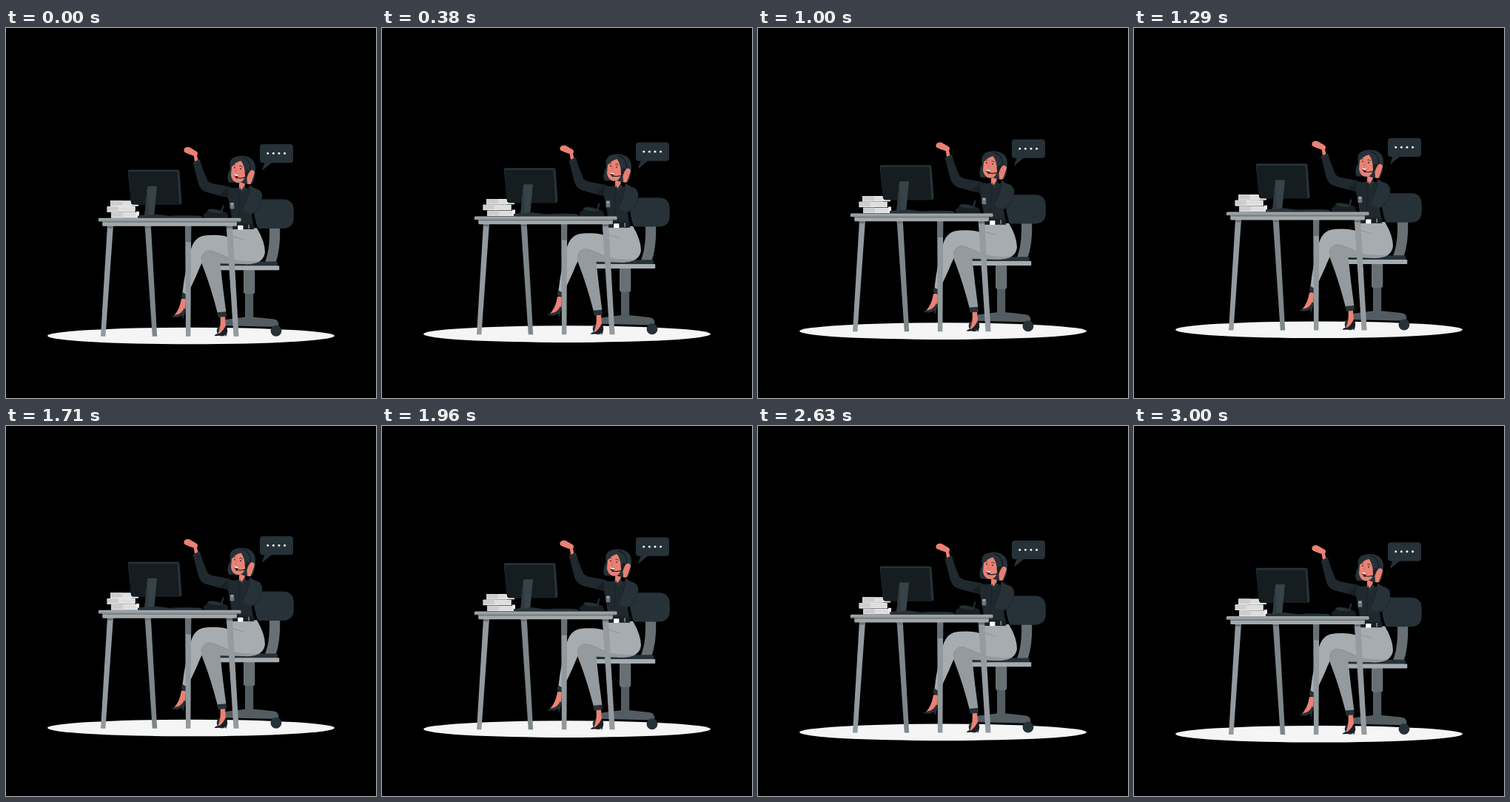
These frames come from a looping animation (500x500 px, 3040 ms). An HTML page with a canvas:

```html
<!DOCTYPE html>
<html lang="en">
<head>
<meta charset="utf-8">
<style>
html, body { margin: 0; width: 100%; height: 100%; overflow: hidden; background: #000; }
canvas { display: block; width: 500px; height: 500px; }
</style>
</head>
<body>
<canvas id="stage"></canvas>
<script>
const LOOP = 3040, FRAMES = 73, RISE = 9.7;
const canvas = document.getElementById('stage');
const ctx = canvas.getContext('2d');
const scale = window.devicePixelRatio || 1;
canvas.width = canvas.height = 500 * scale;

const DARK = '#263238', DEEP = '#182024', SHIRT = '#20292e', SKIN = '#e98274';
const LIGHT = '#a6acaf', MID = '#949a9d', STEEL = '#687074';

function fill(d, color) {
  ctx.fillStyle = color;
  ctx.fill(new Path2D(d));
}

function line(d, color, width) {
  ctx.strokeStyle = color;
  ctx.lineWidth = width;
  ctx.stroke(new Path2D(d));
}

function box(x, y, w, h, color, r = 0) {
  ctx.fillStyle = color;
  ctx.beginPath();
  ctx.roundRect(x, y, w, h, r);
  ctx.fill();
}

function oval(x, y, rx, ry, color, turn = 0) {
  ctx.fillStyle = color;
  ctx.beginPath();
  ctx.ellipse(x, y, rx, ry, turn, 0, Math.PI * 2);
  ctx.fill();
}

function drawBubble() {
  box(343, 157.2, 45, 25.2, DARK, 4);
  fill('M350 181L345.6 193.3L359.5 182Z', DARK);
  for (let i = 0; i < 4; i++) oval(353.8 + i * 7.6, 169.8, 1.45, 1.45, '#fff');
}

function drawChair() {
  fill('M356 270H370.3Q371 300 364 319H349Q357 301 356 270Z', STEEL);
  fill('M334 231.8H374Q388.8 232 388.8 247V257Q388.5 271 374 271.2H341Q335 262 334 231.8Z', DARK);
  box(323, 356, 11.2, 37, '#535d61');
  box(321, 326, 15.3, 33.5, STEEL, 3);
  fill('M295 394.5L322 391H336L361 393.6Q368 394.4 368.2 400V404.2L295 402.5Z', '#535d61');
  oval(292, 409.3, 7.3, 7.5, DARK);
  oval(365, 409.4, 7.4, 7.5, DARK);
  box(284, 315.8, 83, 7, DARK, 2);
  box(284, 321.6, 85.3, 6, LIGHT, 1);
}

function drawFeet() {
  fill('M237 366L243 365.5L242.5 380L232 389.5L227 389Q235 380 237 366Z', SKIN);
  fill('M222.8 390Q230 387.6 233 387Q239 384 240.5 379L242.8 380Q242 385 239.5 393L238.4 393L238.2 388.5Q233 393 222.8 390Z', DARK);
  fill('M237.8 357L245 361L243.2 367L236.8 364Z', DARK);
  fill('M289.5 390H296L297 403L291 414.5L286 415Q291 403 289.5 390Z', SKIN);
  fill('M281.6 416.2Q283 413.2 288.4 413.3Q294 409 296.7 402.5Q299.8 406 298.8 411L297.7 416.8H296.7L296.4 412.5Q293 417 281.6 416.2Z', DEEP);
  fill('M285.4 384.5L297.3 383.5L298 390.2L286.5 391.2Z', DARK);
}

function drawLegs() {
  fill('M307 271L339 270.5Q350 289 350 303.5Q348 319 326 319.4Q298 319 277 303Q268 307 258 333L244.6 362L238.4 358.5Q242 326 250 299Q255 280.6 273 280.2Q291 279 301 283Z', LIGHT);
  fill('M264 313Q265 300.8 277 301.1Q290 305 304 312.5Q324 317 344 315Q336 319.3 322 319.3L289.5 318.5Q293 352 297.4 384L286 386Q277 351 267 325Q264 318 264 313Z', MID);
  line('M264 313Q265 300.8 277 301.1Q290 305 304 312.5', '#82898c', .6);
  line('M306 282Q314 284 321 286.5', '#858c8f', .8);
  drawFeet();
}

function drawRaisedArm() {
  fill('M253.8 173Q247 170.8 242 168.5Q239 166 241.4 162.8Q244 160.3 248 161.5L257.5 167Q260.4 169.7 258 172.3L259.6 179L255 181Z', SKIN);
  fill('M252.6 182L261.6 177.5Q266 192 271.8 205.5Q274 209 280 210.5L303 215L302 230Q283 225.5 270 221.8Q262 219 259.5 209Z', SHIRT);
  line('M253.2 184L262.5 179.5', '#303b40', .8);
}

function drawTorso() {
  fill('M299.3 215Q308 218 316 215.5L328 217Q344 219 346 227Q347 240 338 249L332 252L335 272H306Q305 250 300 230Z', SHIRT);
  drawRaisedArm();
  fill('M300 215V230Q293 228 289 225Q296 222 300 215Z', DEEP);
  fill('M329 212.5L336 216.8Q347.5 219.5 346 230Q344 244 333 250Q323 253 319 244Q327 230 329 212.5Z', DARK);
  line('M319 245Q325 236 329.2 218', DEEP, 1);
  line('M316 219L314 262', DEEP, .7);
  fill('M315.4 206H323.8L322 216L318.4 221L314.8 216Z', SKIN);
  fill('M315 214L318.5 219L322 213.5L325 217L319 225Z', DARK);
  box(302.6, 236.2, 5.7, 8.6, '#6e787c', .7);
  fill('M303.9 237L305.4 240L307 237Z', '#c3c8ca');
  box(306, 264.5, 29.2, 7.8, DEEP, 1);
  box(313.2, 267, 7.2, 5.7, '#fff', .6);
  box(327.5, 266, 1.3, 5.5, '#9ca4a8');
}

function drawHead() {
  fill('M301 209Q296.8 202 303.2 190Q300.5 180 307 175.5Q315 171.5 325 173.8Q337 177 337 190Q337 203 333 210Q326 213 318 209Z', DARK);
  fill('M305 188Q307 182 317 179.4Q324 182 323.8 190L323 201Q321 209.5 313 209.5Q305.2 208 304 199Z', SKIN);
  fill('M303 190Q303 178 315 175Q329 175 332 187L326 202L322.8 198Q323 187 317.5 179.6Q309 182 303 190Z', DARK);
  oval(309, 188.8, .75, 1.15, DEEP);
  oval(317, 190.5, .75, 1.15, DEEP);
  line('M306.7 186Q308.2 184.3 310.2 185.4M315.4 186.8Q318 185.8 319.7 188.2', DEEP, .8);
  line('M312.4 189.5L310.5 194.2L312.5 194.8', '#c85e56', .65);
  fill('M307.8 197.4Q311 198.8 315 198.5Q313.5 203.4 310.2 202.3Q308 201 307.8 197.4Z', '#702c30');
  fill('M308 197.6Q311 198.9 314.7 198.7L313.7 200.3Q310 200.4 308.3 199Z', '#fff');
  line('M319 175Q331 178 330.6 193', '#111a1e', 1.2);
  oval(326.5, 197, 3.5, 5, DEEP, .15);
  line('M326 201Q320 204.2 312 202.8', DEEP, 1.1);
  oval(311.7, 202.6, 1.7, 1.05, DEEP, .2);
  fill('M326.2 211L325.5 203Q327 196 331 192.4Q336.8 192 335.7 197L333 205L330.5 211.5Z', SKIN);
  line('M327.4 202L331.5 195.6M329.5 204.5L333.5 198', '#cc6b61', .5);
}

function drawMonitor() {
  fill('M167 191.8H232Q234.2 191.8 234.5 194L237.5 235.5Q237.6 238.5 235 238.8H173Q169.5 239 169 236L164.7 194.5Q164.7 191.8 167 191.8Z', DARK);
  fill('M165.6 194.5H231.5L234.2 238.8H172Q169.3 239 169 236Z', '#151d20');
  fill('M178 257V254Q190 251.5 203 252L222 254.3V257Z', DARK);
  fill('M191.2 214H204L200.4 252L187.2 254Z', '#374348');
  fill('M191.2 214L187.2 254L193 253.2Z', '#303b40');
  fill('M221 257V254.5Q242 252.6 261 254Q266 255 266 257Z', DARK);
  line('M222 254.5Q231 253.3 244 253.8', DEEP, 1);
}

function drawBook(x, y, w, seam) {
  box(x, y, w, 7.4, '#e4e4e4', .6);
  box(x, y, seam, 7.4, '#d0d0d0', .6);
  line(`M${x + .5} ${y + 2.5}H${x + w}M${x + 1} ${y + 4.7}H${x + w - 1}`, '#c0c0c0', .4);
  line(`M${x} ${y + 7.1}H${x + w}`, '#f5f5f5', .8);
}

function drawDeskItems() {
  drawBook(142, 249.3, 37.5, 16);
  drawBook(136.6, 241.3, 38.2, 15);
  drawBook(141, 233.6, 28, 16);
  fill('M169 237L179 238.7V241H169Z', '#eee');
  box(176, 248.2, 4, 6.2, '#eee');
  drawMonitor();
  fill('M267 257V252L272.5 248V245.5Q283 243.5 291 247L299 250.5L300.5 257Z', DEEP);
  fill('M272 247Q273 244.5 279 245L290 248V250.5L277 249.4Z', DARK);
  line('M291 250L293.5 240', DARK, 2);
}

function drawLeg(x1, x2, x3, x4, color, shade) {
  fill(`M${x1} 267H${x2}L${x4} 417H${x3}Z`, color);
  const k = (shade - 267) / 150;
  fill(`M${x1} 267H${x2}L${x2 + (x4 - x2) * k} ${shade}H${x1 + (x3 - x1) * k}Z`, STEEL);
}

function drawDesk() {
  drawLeg(187.6, 195.8, 197.8, 204.2, '#7d8689', 271);
  drawLeg(242.2, 250.2, 243, 249.4, '#92999d', 289.5);
  drawLeg(137, 145, 128, 134.4, '#939a9f', 271);
  drawLeg(297.7, 306, 307.6, 314.6, '#959ba0', 271);
  box(130.3, 261, 181.6, 7, '#a3a9ab', 1.5);
  box(130.3, 261, 181.6, 2.1, '#697174');
  box(124.8, 257.1, 192.8, 4.7, '#9da3a5', 1.5);
  line('M126 260.9H316.6', '#848b8e', .9);
}

function drawScene() {
  oval(250, 416.3, 194, 11.3, '#f5f5f5');
  drawBubble();
  drawChair();
  drawLegs();
  drawTorso();
  drawHead();
  drawDeskItems();
  drawDesk();
}

// Linear rise and fall, stepped at 24 frames a second.
function lift(ms) {
  const step = Math.min(FRAMES - 1, Math.floor((ms + 5) * 24 / 1000));
  const u = (step + 1) / FRAMES;
  return RISE * (1 - Math.abs(2 * u - 1));
}

function render(now) {
  ctx.setTransform(scale, 0, 0, scale, 0, 0);
  ctx.fillStyle = '#000';
  ctx.fillRect(0, 0, 500, 500);
  ctx.translate(0, -lift(now % LOOP));
  drawScene();
  requestAnimationFrame(render);
}
requestAnimationFrame(render);
</script>
</body>
</html>
```
